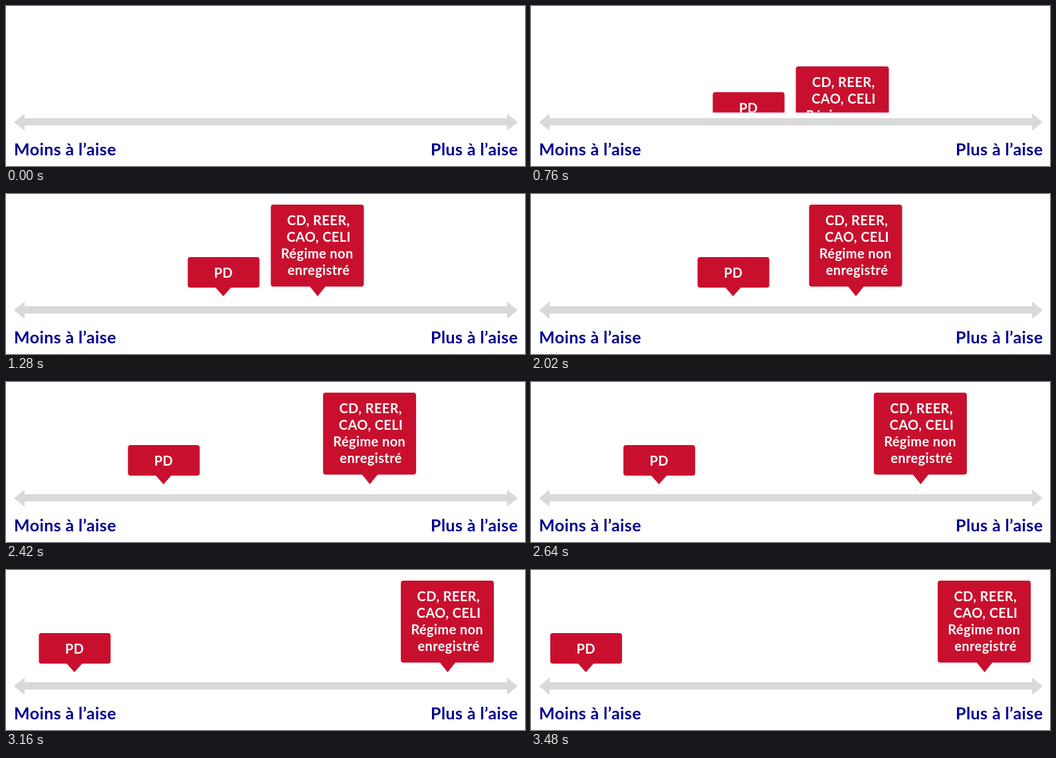
Write an HTML page that moves like this. It is 781 by 241 pixels and loops after 3.58 s.

```html
<!DOCTYPE html>
<html lang="fr">
<head>
<meta charset="utf-8">
<style>
  html, body { margin: 0; width: 100%; height: 100%; overflow: hidden; background: #fff; }
  svg { display: block; }
  text { font: 700 20px Lato, "Open Sans", sans-serif; letter-spacing: .4px; fill: #fff; text-anchor: middle; }
  .end { font-size: 25px; fill: #00008f; }
  .box { fill: #c8102e; }
</style>
</head>
<body>
<svg width="781" height="241" viewBox="0 0 781 241">
  <clipPath id="above"><rect width="781" height="160.5"/></clipPath>
  <path fill="#d9d9d9" d="M12 175 28 162V169H754V162L770 175 754 188V180H28V188Z"/>
  <text class="end" x="12" y="225" style="text-anchor:start">Moins à l’aise</text>
  <text class="end" x="770.4" y="225" style="text-anchor:end">Plus à l’aise</text>
  <g id="tags" clip-path="url(#above)">
    <g id="small">
      <rect class="box" width="108" height="46" rx="4"/>
      <path class="box" d="M41.5 45.5h24l-12 13.5z"/>
      <text x="53.7" y="31">PD</text>
    </g>
    <g id="large">
      <rect class="box" width="140" height="123.5" rx="4"/>
      <path class="box" d="M58.5 123h24l-12 15z"/>
      <text x="71.7" y="31">CD, REER,</text>
      <text x="72" y="56">CAO, CELI</text>
      <text x="69.7" y="81">Régime non</text>
      <text x="72" y="106">enregistré</text>
    </g>
  </g>
</svg>
<script>
  const LOOP = 3580, STEP = 20, HIDDEN_Y = 163;
  const byId = id => document.getElementById(id);
  const tags = [
    { el: byId("small"), x0: 273.5, x1: 29, y: 95 },
    { el: byId("large"), x0: 398.5, x1: 612, y: 16 },
  ];
  const progress = (t, from, to) => Math.min(1, Math.max(0, (t - from) / (to - from)));
  const mix = (a, b, k) => a + (b - a) * k;
  const easeOut = u => u + u * u - u * u * u;
  const easeInOut = u => u * u * (3 - 2 * u);

  function draw(t) {
    const rise = easeOut(progress(t, 420, 1280));
    const spread = easeInOut(progress(t, 1680, 3480));
    byId("tags").style.display = rise > 0 ? "" : "none";
    for (const { el, x0, x1, y } of tags)
      el.setAttribute("transform", `translate(${mix(x0, x1, spread)} ${mix(HIDDEN_Y, y, rise)})`);
  }

  const start = performance.now();
  function tick() {
    const t = (performance.now() - start) % LOOP;
    draw(Math.floor(t / STEP) * STEP);
    requestAnimationFrame(tick);
  }
  tick();
</script>
</body>
</html>
```
